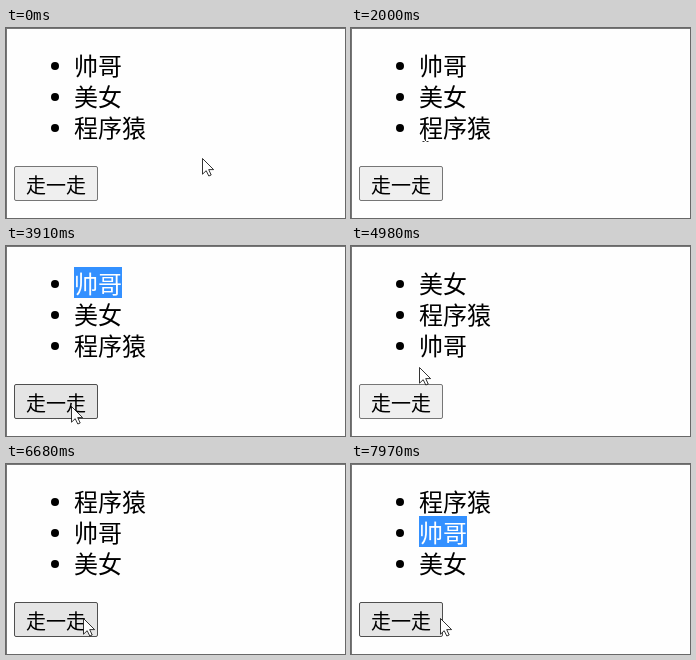
Write an HTML page that moves like this. It is 339 px wide and 190 px high and loops after 8 s.

```html
<!DOCTYPE html>
<html lang="zh-CN">
<meta charset="utf-8">
<style>
html, body { margin: 0; width: 100%; height: 100%; overflow: hidden; background: #fefefe; }
svg { display: block; width: 100vw; height: 100vh; font-family: "Noto Sans CJK SC", "Noto Sans CJK", sans-serif; font-weight: 300; }
#rows { font-size: 24px; }
#rows tspan { fill: #fff; font-weight: 400; }
#button text { font-size: 20px; }
#button rect { fill: #efefef; stroke: #767676; }
#button.hover rect { fill: #e5e5e5; stroke: #4f4f4f; }
</style>
<svg viewBox="0 0 339 190">
  <path d="M0 .5H339M.5 0V190" stroke="#777"/>
  <rect id="mark" x="68" height="31" fill="#3390ff"/>
  <g id="rows"></g>
  <g id="button">
    <rect x="8.5" y="138.5" width="83" height="34" rx="1.5"/>
    <text x="20" y="164.5">走一走</text>
  </g>
  <path id="arrow" d="M.5 .5V16.2L4.2 12.7 6.8 18 9.2 17 6.7 11.6H11.6Z" fill="#fff" stroke="#000" stroke-width=".8"/>
  <path id="beam" d="M-3 -8.5H-1M1 -8.5H3M0 -8V8M-3 8.5H-1M1 8.5H3" fill="none" stroke="#333"/>
</svg>
<script>
const LOOP = 8000, LEFT = 68, TOP = 21, ROW = 31, CHAR = 24, STEP = 150;
const items = ['帅哥', '美女', '程序猿'];
const clicks = [4470, 6530];

// Each trip curves on from the end of the one before.
const home = [196, 130];
const trips = [
  { start: 160, end: 870, bend: [120, 182], to: [68, 157] },
  { start: 2000, end: 2540, bend: [88, 10], to: [70, 33] },
  { start: 2820, end: 2970, bend: [102, 33], to: [122, 35], drag: true },
  { start: 3120, end: 3910, bend: [150, 125], to: [65, 160] },
  { start: 4740, end: 4980, bend: [65, 140], to: [68, 121] },
  { start: 5130, end: 5270, bend: [66, 100], to: [118, 101], drag: true },
  { start: 5420, end: 5850, bend: [185, 115], to: [77, 154] },
  { start: 6800, end: 7330, bend: [65, 60], to: [70, 69] },
  { start: 7460, end: 7580, bend: [100, 70], to: [116, 73], drag: true },
  { start: 7850, end: 7970, bend: [110, 130], to: [89, 154] }
];

const el = id => document.getElementById(id);
const rowAt = y => Math.floor((y - TOP) / ROW);
const curve = (a, b, c, p) => a.map((v, i) => (1 - p) ** 2 * v + 2 * p * (1 - p) * b[i] + p * p * c[i]);

// Share of a trip covered at time t, in even jumps.
function progress({ start, end }, t) {
  const jumps = Math.round((end - start) / STEP);
  const done = Math.floor((t - start) / (end - start) * jumps + 1e-6);
  return Math.min(1, (done + 1) / (jumps + 1));
}

function draw(now) {
  const t = now % LOOP;
  const past = clicks.filter(c => c <= t), shift = past.length;
  const list = items.map((_, i) => items[(i + shift) % items.length]);

  let pos = home, row = 0, count = 0;
  for (const trip of trips.filter(m => m.start <= t)) {
    pos = curve(pos, trip.bend, trip.to, progress(trip, t));
    if (trip.drag && past.every(c => c < trip.start)) {
      row = rowAt(trip.to[1]);
      count = Math.min(list[row].length, Math.round((pos[0] - LEFT) / CHAR));
    }
  }
  const [x, y] = pos.map(Math.round);

  el('rows').innerHTML = list.map((word, i) => {
    const n = i === row ? count : 0, top = TOP + i * ROW;
    return `<circle cx="49" cy="${top + 17}" r="4"/>` +
      `<text x="${LEFT}" y="${top + 25.5}"><tspan>${word.slice(0, n)}</tspan>${word.slice(n)}</text>`;
  }).join('');
  el('mark').setAttribute('y', TOP + row * ROW);
  el('mark').setAttribute('width', count * CHAR);

  const over = list[rowAt(y)];
  const onText = over && x >= LEFT && x < LEFT + over.length * CHAR;
  const onButton = x >= 8 && x < 92 && y >= 138 && y < 173;
  el('button').classList.toggle('hover', onButton);
  el('arrow').setAttribute('visibility', onText ? 'hidden' : 'visible');
  el('beam').setAttribute('visibility', onText ? 'visible' : 'hidden');
  el('arrow').setAttribute('transform', `translate(${x} ${y})`);
  el('beam').setAttribute('transform', `translate(${x + .5} ${y})`);
}

function tick() {
  draw(performance.now());
  requestAnimationFrame(tick);
}
tick();
</script>
</html>
```
